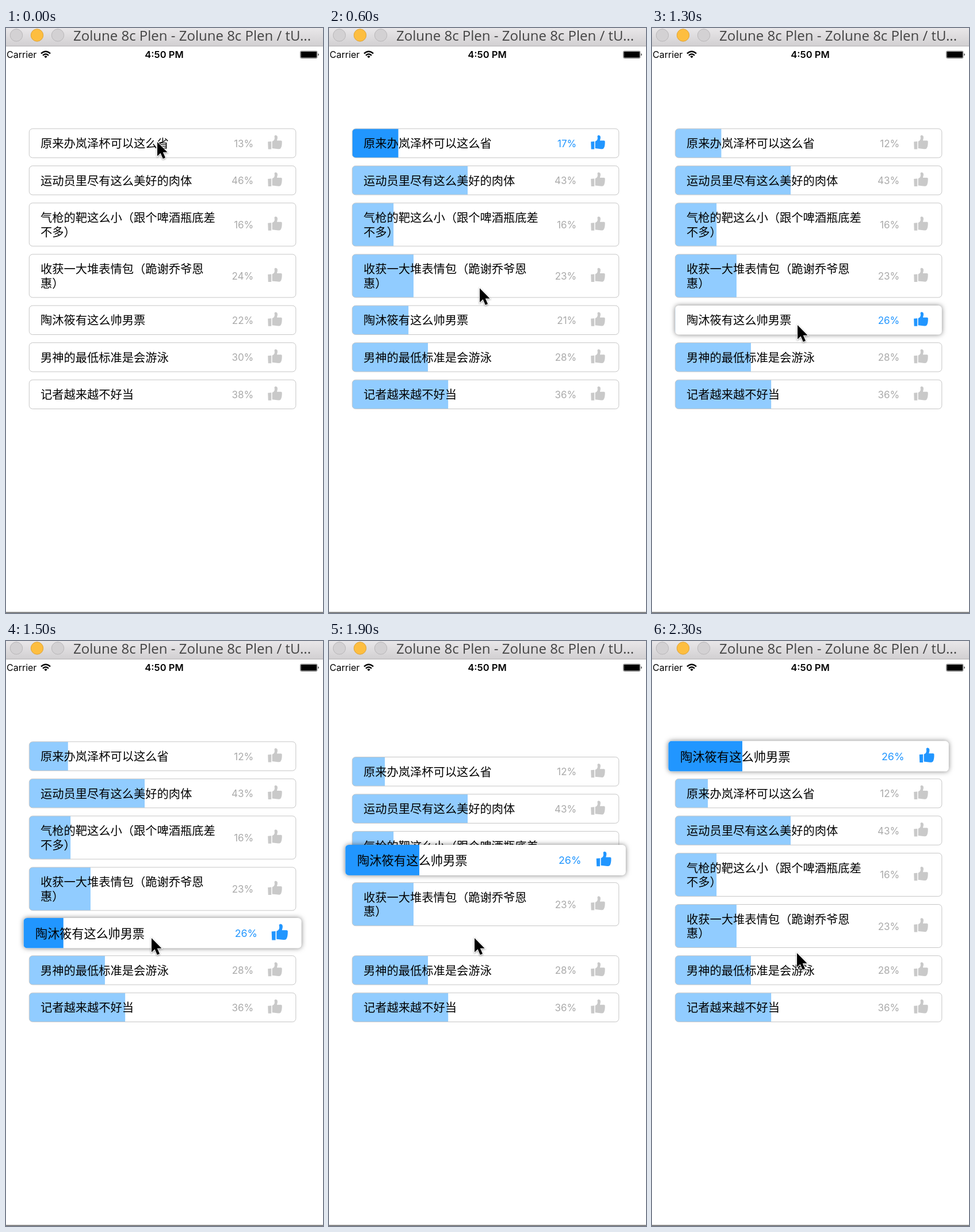
Recreate the animation shown at these times as an HTML page. Size 551x1016 px, loop 2400 ms.

```html
<!DOCTYPE html>
<html lang="zh">
<head>
<meta charset="utf-8">
<title>Poll</title>
<style>
  html, body { margin: 0; width: 100%; height: 100%; overflow: hidden; background: #fff; }
  svg { display: block; width: 551px; height: 1016px; }
  .title { font: 24px "Open Sans", sans-serif; fill: #444; }
  .status { font: 16px Inter, sans-serif; }
  .clock { font-weight: 600; font-size: 16.5px; text-anchor: middle; }
  .label { font: 20.25px "Noto Sans CJK SC", "Noto Sans CJK", sans-serif; }
  .percent { font: 17px Inter, sans-serif; text-anchor: end; }
  .frame { fill: none; stroke: #c6c6c6; }
  .lifted .card { filter: drop-shadow(0 0 4px rgba(0, 0, 0, .5)); }
  .lifted .frame { display: none; }
  .bar { fill: #91ccff; }
  .percent, .thumb { fill: #aaa; }
  .thumb { fill: #c9c9c9; }
  .chosen .bar, .chosen .percent, .chosen .thumb { fill: #2196ff; }
</style>
</head>
<body>
<svg viewBox="0 0 551 1016">
  <defs>
    <linearGradient id="chrome" x2="0" y2="1">
      <stop stop-color="#e9e7e9"/><stop offset="1" stop-color="#d1cfd1"/>
    </linearGradient>
    <path id="thumb" d="M0 11.5L6 11V24.5H.5ZM7.5 11L10 9.5C12 7.5 12 5 11.3 2C12-.5 16-.5 16.7 3C17 6 16 8 15.7 9.5H23Q25 10 24.5 12.5Q24.5 20 22.2 23Q21 24.5 18 24.2L7.5 23Z"/>
  </defs>
  <rect width="551" height="1016" fill="#fff"/>

  <rect width="551" height="32" fill="url(#chrome)"/>
  <path d="M0 31.5H551" stroke="#b3b1b3"/>
  <g fill="#d3d1d3" stroke="#b9b7b9">
    <circle cx="18" cy="12.5" r="10.7"/>
    <circle cx="54" cy="12.5" r="10.7" fill="#fdbe40" stroke="#e0a336"/>
    <circle cx="90" cy="12.5" r="10.7"/>
  </g>
  <text class="title" x="117" y="22">Zolune 8c Plen - Zolune 8c Plen / tU...</text>

  <text class="status" x="1" y="52">Carrier</text>
  <g fill="none" stroke="#000" stroke-width="2.4">
    <path d="M61 44.4Q69 37 77 44.4M64 47.6Q69 43 74 47.6"/>
    <path d="M66.3 49.5Q69 47 71.7 49.5L69 52.3Z" fill="#000" stroke="none"/>
  </g>
  <text class="status clock" x="275" y="52">4:50 PM</text>
  <rect x="511.5" y="40" width="29.5" height="12.5" rx="2" fill="#fff" stroke="#777"/>
  <rect x="512.5" y="41" width="27.5" height="10.5" rx="1"/>
  <path d="M542.5 44Q545 46.2 542.5 48.5Z"/>

  <g id="rows"></g>
  <path id="cursor" d="M0 0V24.5L5.6 19.2L9.8 29L14 27.2L9.8 17.8H17.5Z" stroke="#fff" stroke-width="2"
    paint-order="stroke" style="filter:drop-shadow(0 1.5px 1.5px rgba(0,0,0,.4))"/>
  <path d="M0 1015H551" stroke="#888" stroke-width="2"/>
</svg>
<script>
const LOOP = 2400, STEP = 100;
const FIRST_TAP = 60, SECOND_TAP = 1290, LIFT = 300, MOVE = 690, FILL = 400;
const LEFT = 40.3, WIDTH = 463.5, GAP = 14.1, TOP = 174.9, RISING = 4;

// lines of text, percentage before and after the first tap, filled share
const rows = [
  { lines: ['原来办岚泽杯可以这么省'], before: 13, after: 17, share: .173 },
  { lines: ['运动员里尽有这么美好的肉体'], before: 46, after: 43, share: .433 },
  { lines: ['气枪的靶这么小（跟个啤酒瓶底差', '不多）'], before: 16, after: 16, share: .155 },
  { lines: ['收获一大堆表情包（跪谢乔爷恩', '惠）'], before: 24, after: 23, share: .23 },
  { lines: ['陶沐筱有这么帅男票'], before: 22, after: 21, share: .211 },
  { lines: ['男神的最低标准是会游泳'], before: 30, after: 28, share: .284 },
  { lines: ['记者越来越不好当'], before: 38, after: 36, share: .36 },
];
Object.assign(rows[0], { last: 12, lastShare: .1225 });
Object.assign(rows[RISING], { last: 26, lastShare: .264 });

// time, x, y of the pointer tip
const pointer = [[0, 263, 198], [150, 263, 198], [600, 262, 452], [1000, 255, 527],
  [1250, 253, 516], [2100, 253, 516], [2300, 252, 542], [LOOP, 252, 542]];

const clamp = v => Math.min(1, Math.max(0, v));
const mix = (a, b, k) => a + (b - a) * k;

// cubic-bezier(.42, 0, .58, 1)
function ease(x) {
  let lo = 0, hi = 1;
  for (let i = 0; i < 24; i++) {
    const s = (lo + hi) / 2, r = 1 - s;
    if (1.26 * s * r * r + 1.74 * s * s * r + s ** 3 < x) lo = s; else hi = s;
  }
  return lo * lo * (3 - 2 * lo);
}
const progress = (t, start, length) => clamp((t - start) / length);

function buildRows() {
  const host = document.getElementById('rows');
  let top = TOP;
  rows.forEach((row, i) => {
    row.top = top;
    row.height = row.lines.length > 1 ? 75 : 50.4;
    top += row.height + GAP;
    const h = row.height, mid = h / 2;
    const box = `width="${WIDTH}" height="${h}" rx="6"`;
    const first = mid + 8 - 12.2 * (row.lines.length - 1);
    const g = document.createElementNS('http://www.w3.org/2000/svg', 'g');
    g.innerHTML = `<clipPath id="clip${i}"><rect ${box}/></clipPath>
      <rect class="card" ${box} fill="#fff"/>
      <rect class="bar" height="${h}" clip-path="url(#clip${i})"/>
      <rect class="frame" ${box}/>
      ${row.lines.map((s, n) => `<text class="label" x="19.7" y="${first + n * 24.4}">${s}</text>`).join('')}
      <text class="percent" x="390" y="${mid + 6.5}"></text>
      <use class="thumb" href="#thumb"/>`;
    host.append(g);
    row.node = g;
    for (const part of ['bar', 'percent', 'thumb']) row[part] = g.querySelector('.' + part);
  });
  host.append(rows[RISING].node);
}

function drawRow(row, i, t) {
  const second = t >= SECOND_TAP, tapped = t >= FIRST_TAP;
  const chosen = second ? i === RISING : tapped && i === 0;
  const rising = i === RISING;
  const firstFill = ease(progress(t, FIRST_TAP, FILL));
  const secondFill = ease(progress(t, SECOND_TAP, FILL));
  const lift = rising ? ease(progress(t, SECOND_TAP, LIFT)) : 0;
  const move = ease(progress(t, SECOND_TAP + LIFT, MOVE));

  let share = row.share * firstFill;
  if (second && row.last) share = mix(rising ? 0 : row.share, row.lastShare, secondFill);
  row.bar.setAttribute('width', share * WIDTH);
  row.percent.textContent = (second && row.last || (tapped ? row.after : row.before)) + '%';

  let y = row.top;
  if (rising) y = mix(y, TOP, move);
  else if (i < RISING) y += (rows[RISING].height + GAP) * move;
  const scale = 1 + .052 * lift, cx = WIDTH / 2, cy = row.height / 2;
  row.node.setAttribute('transform',
    `translate(${LEFT + cx} ${y + cy}) scale(${scale}) translate(${-cx} ${-cy})`);

  const start = second ? SECOND_TAP : FIRST_TAP;
  const pulse = chosen ? 1 + .1 * Math.sin(Math.PI * progress(t, start, FILL)) : 1;
  row.thumb.setAttribute('transform',
    `translate(427.2 ${cy - 1.8}) scale(${pulse}) translate(-12.3 -12.3)`);
  row.node.classList.toggle('chosen', chosen);
  row.node.classList.toggle('lifted', lift > 0);
}

function drawPointer(t) {
  const n = pointer.findIndex(p => p[0] > t);
  const [t0, x0, y0] = pointer[n - 1], [t1, x1, y1] = pointer[n];
  const k = ease((t - t0) / (t1 - t0));
  document.getElementById('cursor')
    .setAttribute('transform', `translate(${mix(x0, x1, k)} ${mix(y0, y1, k)})`);
}

function render(t) {
  rows.forEach((row, i) => drawRow(row, i, t));
  drawPointer(t);
}

buildRows();
render(0);
let origin;
requestAnimationFrame(function tick(now) {
  origin ??= now;
  render(Math.floor((now - origin) % LOOP / STEP) * STEP);
  requestAnimationFrame(tick);
});
</script>
</body>
</html>
```
